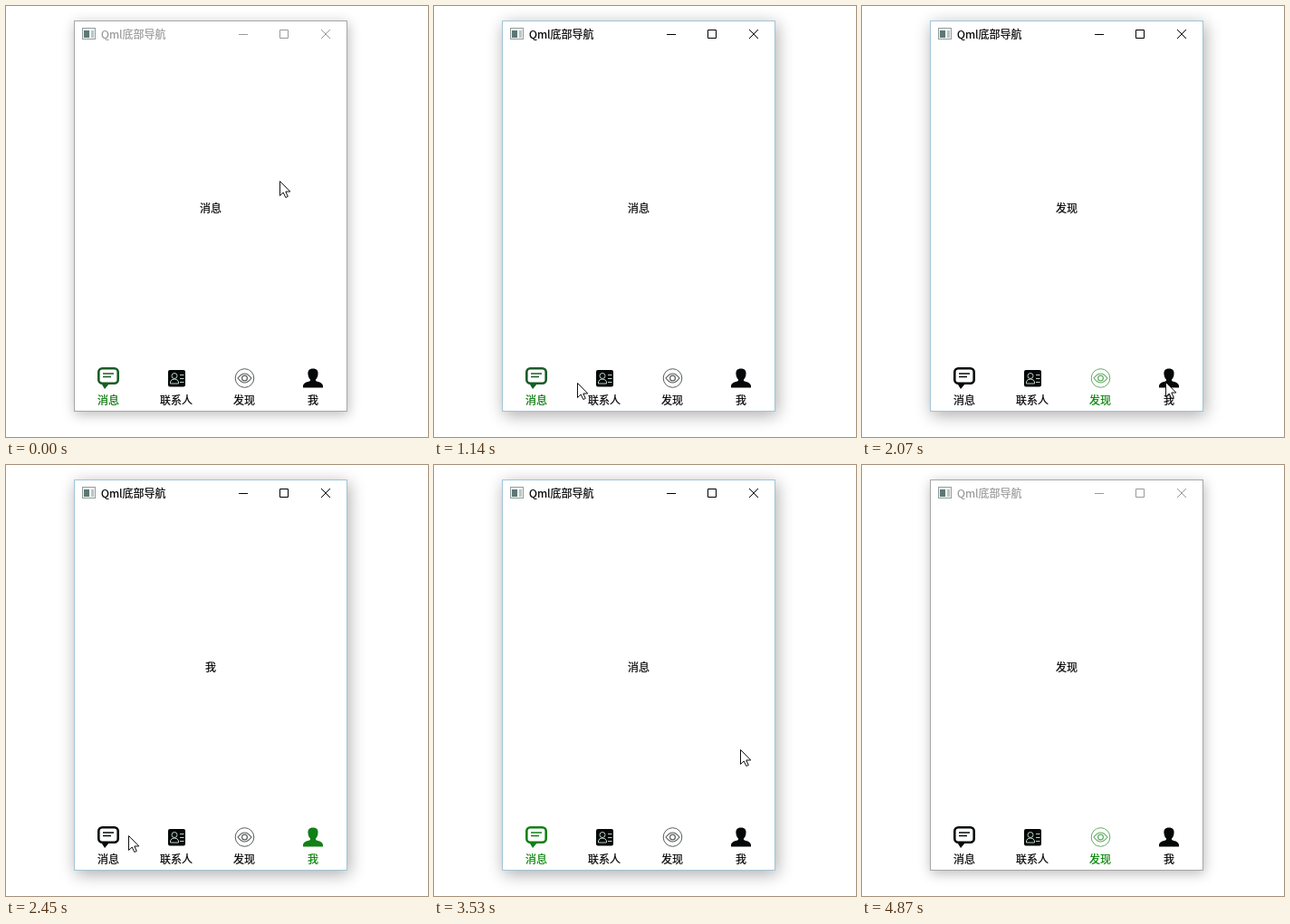
An HTML page for the animation above (4.94 s loop, 466x476 px).

```html
<!DOCTYPE html>
<html lang="zh-CN">
<head>
<meta charset="utf-8">
<title>Qml底部导航</title>
<style>
  html, body { margin: 0; width: 100%; height: 100%; overflow: hidden; background: #fff; }
  #frame {
    position: absolute; left: 75px; top: 16px; width: 300px; height: 430px;
    background: #fff; border: 1px solid #a6a6a6;
    box-shadow: 1px 3px 13px rgba(0, 0, 0, .28);
  }
  #frame.active { border-color: #a3c3d6; box-shadow: 2px 4px 17px rgba(0, 0, 0, .33); }
  svg { position: absolute; left: 0; top: 0; }
  text {
    font: 12px "Noto Sans CJK SC", "Noto Sans CJK", sans-serif;
    fill: currentColor; stroke: currentColor; stroke-width: .2px;
  }
  #pages text, .tab text { text-anchor: middle; }
  .icon { fill: currentColor; }
  .line { fill: none; stroke: currentColor; }
  .cut { fill: none; stroke: #bdd0c4; }
</style>
</head>
<body>
<div id="frame"></div>
<svg width="466" height="476" viewBox="0 0 466 476">
  <clipPath id="view"><rect x="76" y="47" width="300" height="345"/></clipPath>

  <rect x="84.5" y="24.5" width="14" height="12" fill="#f3f5f5" stroke="#929d9d"/>
  <path d="M86 27h6v8h-6z" fill="#5d7774"/>
  <path d="M94 27h3v8h-3z" fill="#bcc6c4"/>
  <g id="chrome">
    <text x="105" y="35.5">Qml底部导航</text>
    <path class="line" d="M257 31.5h10M302.5 26.5h9v9h-9zM348 26l10 10M358 26l-10 10"/>
  </g>

  <g id="pages" clip-path="url(#view)"></g>

  <g class="tab">
    <g class="icon">
      <rect class="line" x="102.3" y="400.3" width="21.400" height="16.400" rx="4" stroke-width="2.600"/>
      <path d="M105 416.500l4 6.500 5.500-6.500z"/>
      <path class="line" d="M107 406h12M107 409.500h9" stroke-width="1.400"/>
    </g>
    <text x="113" y="440">消息</text>
  </g>
  <g class="tab">
    <g class="icon">
      <rect x="179" y="402" width="19" height="18.500" rx="2"/>
      <circle class="cut" cx="186" cy="408.500" r="3"/>
      <path class="cut" d="M181.500 417v-2q1-3 4.500-3t4.500 3v2zM192 407.500h4.500M192 411.500h4.500M192 415.500h4.500"/>
    </g>
    <text x="188" y="440">联系人</text>
  </g>
  <g class="tab">
    <g class="icon" opacity=".66">
      <circle class="line" cx="263.500" cy="411" r="10.300"/>
      <path class="line" d="M256 411q7.500-10 15 0q-7.500 10-15 0z" stroke-width="1.200"/>
      <circle class="line" cx="263.500" cy="411" r="2.900" stroke-width="1.200"/>
    </g>
    <text x="263" y="440">发现</text>
  </g>
  <g class="tab">
    <path class="icon" d="M339 400.500c4.500 0 6 2.500 5.500 6.500c-.3 3-1.500 4.500-2.500 5.500v1.500c3 1.500 7.500 1.500 8 5.500v2h-22v-2c.5-4 5-4 8-5.500v-1.500c-1-1-2.200-2.500-2.500-5.500c-.5-4 1-6.500 5.500-6.500z"/>
    <text x="339" y="440">我</text>
  </g>

  <path id="cursor" d="M.5.5v16l3.700-3.500 2.600 5.500 2.500-1.100-2.500-5.400h5z" fill="#fff" stroke="#111"/>
</svg>
<script>
const LOOP = 4940, REFRESH = 76.5, PAGE = 300, SLIDE = 260;

const home = [302, 193];
// Pointer moves: start, end, x, y
const moves = [
  [0, 440, 195, 24], [550, 910, 140, 412], [1000, 1350, 190, 422], [1380, 1660, 240, 417],
  [1840, 2070, 335, 415], [2220, 2510, 115, 408], [3150, 3402, 394, 256],
  [3402, 3670, 247, 408], [3800, 3930, 263, 415], [4260, 4540, 360, 477]
];
// Clicks: time, tab index
const clicks = [[1357, 1], [1773, 2], [2156, 3], [2669, 0], [3982, 2]];

const $ = id => document.getElementById(id);
const tabs = [...document.querySelectorAll('.tab')];
const pages = tabs.map(tab => {
  const text = tab.querySelector('text').cloneNode(true);
  text.setAttribute('y', 228);
  return $('pages').appendChild(text);
});
const mix = (a, b, u) => a + (b - a) * u;

// Eased progress of a span, 0 before it and 1 after it
function progress(t, start, end) {
  const u = Math.min(1, Math.max(0, (t - start) / (end - start)));
  return u < .5 ? 2 * u * u : 1 - 2 * (1 - u) ** 2;
}

// The screen is refreshed in steps, like a recording
const refreshTime = t => Math.floor((t + 20) / REFRESH) * REFRESH;

function pointerAt(t) {
  return moves.reduce(([x, y], [start, end, toX, toY]) => {
    const u = progress(t, start, end);
    return [mix(x, toX, u), mix(y, toY, u)];
  }, home).map(Math.round);
}

function draw(t) {
  const active = t > 445 && t < 4860;
  $('frame').classList.toggle('active', active);
  $('chrome').style.color = active ? '#000' : '#999';

  const shown = refreshTime(t);
  let position = 0, current = 0;
  for (const [time, tab] of clicks) {
    if (shown < time) break;
    position = mix(current, tab, progress(shown, time, time + SLIDE));
    current = tab;
  }
  pages.forEach((page, i) => page.setAttribute('x', 226 + Math.round(PAGE * (i - position))));

  const green = shown < clicks[0][0] ? ['#1a5c27', '#007000'] : ['#118016', '#008000'];
  tabs.forEach((tab, i) => {
    const [icon, label] = i === current ? green : ['#050808', '#000'];
    tab.firstElementChild.style.color = icon;
    tab.lastElementChild.style.color = label;
  });

  $('cursor').setAttribute('transform', `translate(${pointerAt(shown)})`);
}

function tick() {
  draw(performance.now() % LOOP);
  requestAnimationFrame(tick);
}
tick();
</script>
</body>
</html>
```
